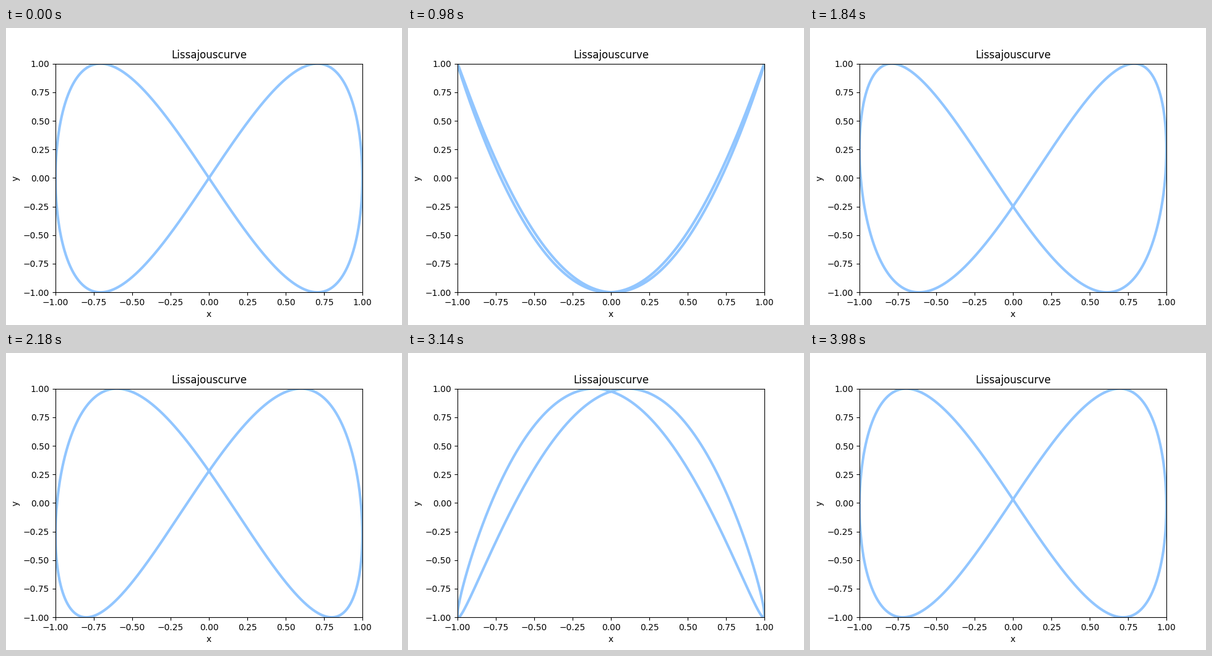
Recreate the animation shown at these times as a matplotlib script. Size 640x480 px, loop 4000 ms.

```python
import numpy as np
import matplotlib.pyplot as plt
from matplotlib.animation import FuncAnimation

FRAMES = 200
INTERVAL = 20  # ms

fig = plt.figure(figsize=(6.4, 4.8), dpi=100)
ax = plt.axes(xlim=(-1, 1), ylim=(-1, 1))
ax.set_title("Lissajouscurve")
ax.set_xlabel("x")
ax.set_ylabel("y")
line, = ax.plot([], [], lw=3, color="#92C6FF")

t = np.linspace(0, 2 * np.pi, 1000)


def update(i):
    phase = 2 * np.pi * i / FRAMES
    line.set_data(np.sin(t), np.sin(2 * t - phase))
    return line,


anim = FuncAnimation(fig, update, frames=FRAMES, interval=INTERVAL,
                     repeat=True, repeat_delay=0, blit=False)
plt.show()
```
